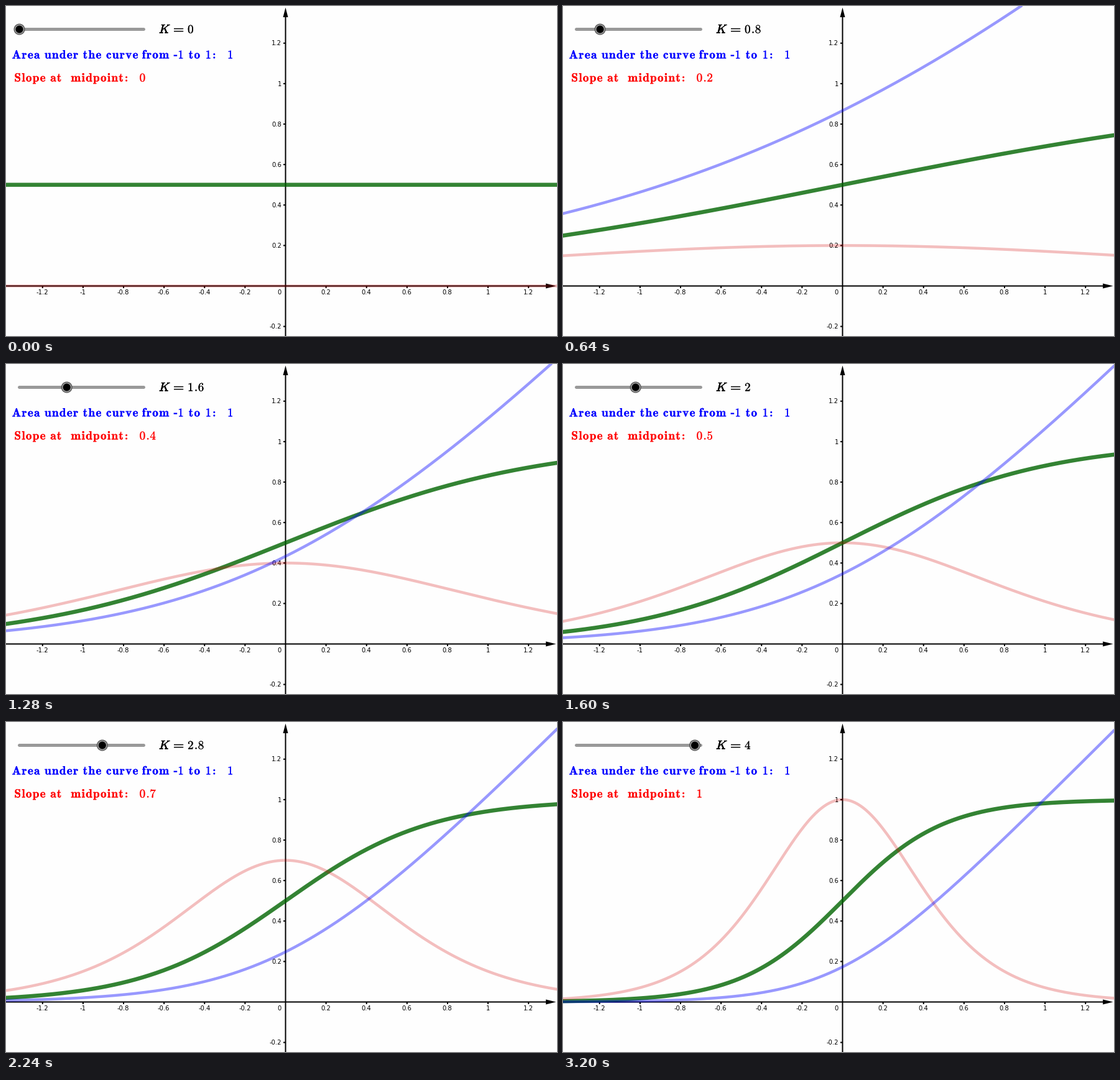
Recreate the animation shown at these times as a matplotlib script. Size 886 by 531 pixels, loop 9.2 s.

```python
import matplotlib.pyplot as plt
import numpy as np
from matplotlib.animation import FuncAnimation
from matplotlib.patches import Circle, Polygon, Rectangle
from matplotlib.patheffects import withStroke

W, H, DPI = 886, 531, 64
PT = 72 / DPI                      # points per pixel
OX, OY, UNIT = 449.5, 450.5, 325.6
STEP_MS, LOOP_MS = 80, 9200
K_STEP, K_MAX = 0.1, 4
SLIDER_X, SLIDER_Y, SLIDER_UNIT = 21.5, 37.5, 47.62
TRACK = r'\hspace{0.075}'

plt.rcParams['mathtext.fontset'] = 'cm'
fig = plt.figure(figsize=(W / DPI, H / DPI), dpi=DPI, facecolor='#fefefe')
ax = fig.add_axes([0, 0, 1, 1])
ax.set_xlim(0, W)
ax.set_ylim(H, 0)
ax.axis('off')


def line(xs, ys, color, width, z, alpha=1, cap='butt'):
    return ax.plot(xs, ys, color=color, lw=width * PT, alpha=alpha, zorder=z,
                   solid_capstyle=cap, solid_joinstyle='round',
                   snap=False)[0]


def shape(patch, z=6):
    patch.set_zorder(z)
    patch.set_snap(False)
    return ax.add_patch(patch)


def bold(s):
    """Letter-spaced bold roman."""
    spaced = TRACK.join(s).replace('.' + TRACK, r'.\hspace{-0.17}')
    return r'$\mathbf{' + spaced + '}$'


def word(x, y, s, color, size=19.2, stroke=0.2):
    return ax.text(x, y, s, color=color, fontsize=size * PT, zorder=6,
                   va='baseline',
                   path_effects=[withStroke(linewidth=stroke,
                                            foreground=color)])


def sentence(y, color, words):
    for x, s in words:
        word(x, y, bold(s), color)


def colon(x, y, color):
    for dy in (1.5, 6.9):
        shape(Circle((x, y - dy), 1.5, fc=color, ec='none'))


def label(x, y, s, ha):
    ax.text(x, y, s, ha=ha, va='baseline', family='DejaVu Sans',
            fontsize=10 * PT, color='black', zorder=2)


def draw_axes():
    line([0, 872], [OY, OY], 'black', 2, 1)
    line([OX, OX], [H, 14], 'black', 2, 1)
    shape(Polygon([(884.5, OY), (868, OY - 4), (868, OY + 4)],
                  fc='black', ec='none'), 1)
    shape(Polygon([(OX, 2.5), (OX - 4, 18), (OX + 4, 18)],
                  fc='black', ec='none'), 1)
    for n in range(-6, 7):
        if n == 0:
            continue
        text = f'{n / 5:g}'
        x, y = OX + n / 5 * UNIT, OY - n / 5 * UNIT
        line([x, x], [OY, OY + 3.5], 'black', 2, 1)
        label(x - 0.5, 464.5, text, 'center')
        if n >= -1:
            line([OX - 3.5, OX], [y, y], 'black', 2, 1)
            label(442.8, y + 3.7, text, 'right')
    label(442.8, 464.5, '0', 'right')


def draw_captions():
    word(246, 43.5, '$K$', 'black', 19.5, 0.8)
    for y in (35.8, 39.9):
        shape(Rectangle((270, y), 15.2, 1.5, fc='black', ec='none'))
    sentence(84.5, 'blue', [(9.6, 'Area'), (62, 'under'), (123.7, 'the'),
                            (161, 'curve'), (218.7, 'from'), (276.3, '1'),
                            (293.7, 'to'), (320.5, '1'), (355.9, '1')])
    shape(Rectangle((269.6, 78.6), 5.6, 2.2, fc='blue', ec='none'))
    colon(334.8, 84.5, 'blue')
    sentence(121.5, 'red', [(13.4, 'Slope'), (71.2, 'at'),
                            (104.3, 'midpoint')])
    colon(193.6, 121.5, 'red')


draw_axes()
draw_captions()

px = np.linspace(-6, W + 6, 400)
x = (px - OX) / UNIT
green = line([], [], (0, 100 / 255, 0), 6.5, 3, 0.8)
red = line([], [], (0.83, 0, 0), 4.5, 4, 0.25)
blue = line([], [], (0, 0, 1), 4.5, 5, 0.4)

line([SLIDER_X, 221.5], [SLIDER_Y] * 2, '#999999', 5, 6, cap='round')
halo = shape(Circle((SLIDER_X, SLIDER_Y), 8.4, fc='#999999', ec='#505050',
                    lw=1.2 * PT), 7)
knob = shape(Circle((SLIDER_X, SLIDER_Y), 6, fc='black', ec='none'), 8)

k_text = word(292, 43.5, bold('0'), 'black')
slope_text = word(214.6, 121.5, bold('0'), 'red')


def update(i):
    k = round(min(i * K_STEP, K_MAX), 1)
    s = 1 / (1 + np.exp(-k * x))
    green.set_data(px, OY - UNIT * s)
    red.set_data(px, OY - UNIT * k * s * (1 - s))
    if k > 0:
        blue.set_data(px, OY - UNIT * np.logaddexp(0, k * x) / k)
    else:
        blue.set_data([], [])
    center = (SLIDER_X + SLIDER_UNIT * k, SLIDER_Y)
    halo.center = knob.center = center
    k_text.set_text(bold(f'{k:g}'))
    slope_text.set_text(bold(f'{k / 4:g}'))
    return green, red, blue, halo, knob, k_text, slope_text


anim = FuncAnimation(fig, update, frames=LOOP_MS // STEP_MS,
                     interval=STEP_MS, repeat=True, blit=False)
plt.show()
```
